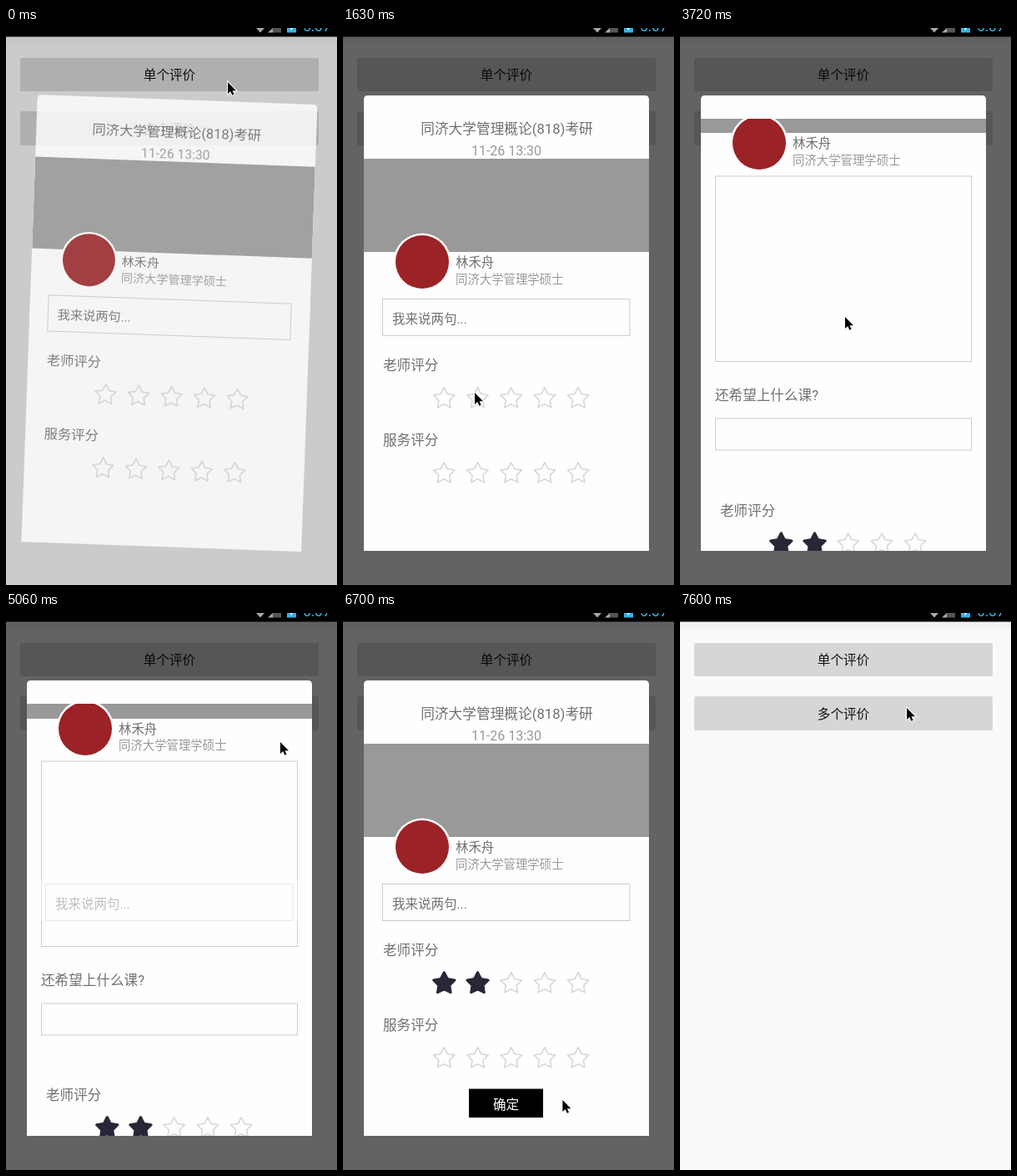
An HTML page for the animation above (8 s loop, 397 by 669 pixels).

```html
<!DOCTYPE html>
<html lang="zh-CN">
<head>
<meta charset="utf-8">
<title>评价</title>
<style>
  html, body { margin: 0; width: 100%; height: 100%; overflow: hidden; background: #f9f9f9; }
  svg { display: block; width: 397px; height: 669px; }
  text { font-family: Roboto, "Noto Sans CJK SC", "Noto Sans CJK", sans-serif; fill: #707070; }
  .mid { text-anchor: middle; }
  .soft { fill: #999; }
  .box { fill: #fefefe; stroke: #ccc; }
  .star { fill: none; stroke: #d9d9d9; stroke-width: 1.7; stroke-linejoin: round; }
  .star.on { fill: #272738; stroke: #272738; stroke-width: 3; }
  #dialog { transform-origin: 196px 354.5px; }
  #cursor { stroke: #fff; stroke-width: 2; paint-order: stroke; }
</style>
</head>
<body>
<svg viewBox="0 0 397 669">
  <defs>
    <clipPath id="pane"><rect x="25" y="109" width="342" height="519"/></clipPath>
  </defs>

  <rect width="397" height="669" fill="#f9f9f9"/>
  <rect y="10" width="397" height="9" fill="#f2f2f2"/>
  <g fill="#d5d7d6">
    <rect x="17" y="36" width="358" height="40" rx="2"/>
    <rect x="17" y="100" width="358" height="41" rx="2"/>
  </g>
  <g class="mid" font-size="15.6">
    <text x="196" y="62" style="fill:#111">单个评价</text>
    <text x="196" y="127" style="fill:#111">多个评价</text>
  </g>
  <rect id="dim" y="10" width="397" height="659"/>

  <rect width="397" height="10.5"/>
  <path d="M300 0h10l-5 5.5z" fill="#aaa"/>
  <path d="M314 5.5L320 0V5.5z" fill="#aaa"/>
  <path d="M320 0h10v5.5h-10z" fill="#555"/>
  <path d="M337 0h11v5.5h-11z" fill="#33b5e5"/>
  <path d="M341 0h3l-2 3z" fill="#fff"/>
  <text x="356" y="4" font-size="17.5" style="fill:#33b5e5">5:07</text>

  <g id="dialog">
    <path d="M25 628V86q0-5 5-5H362q5 0 5 5V628z" fill="#fefefe"/>
    <g clip-path="url(#pane)">
      <g id="header">
        <text class="mid" x="196.5" y="127" font-size="16.7">同济大学管理概论(818)考研</text>
        <text class="mid soft" x="196" y="153" font-size="16">11-26 13:30</text>
        <rect x="25" y="157" width="342" height="112" fill="#999"/>
        <circle cx="95" cy="281" r="34.5" fill="#fefefe"/>
        <circle cx="95" cy="281" r="32" fill="#9b2226"/>
        <text x="135" y="287" font-size="15.4">林禾舟</text>
        <text class="soft" x="135" y="306.5" font-size="14.4">同济大学管理学硕士</text>
      </g>
      <g id="form">
        <rect class="box" x="42.5" y="178" width="307" height="222.5"/>
        <text x="42" y="447" font-size="16.6">还希望上什么课?</text>
        <rect class="box" x="42.5" y="469" width="307" height="38"/>
      </g>
      <g id="hint">
        <rect x="25" y="320" width="342" height="50" fill="#fefefe"/>
        <rect class="box" x="47.5" y="325.5" width="296.5" height="44"/>
        <text x="59" y="354.5" font-size="15.5">我来说两句...</text>
      </g>
      <g id="ratings">
        <text x="48" y="411" font-size="16.6">老师评分</text>
        <text x="48" y="501" font-size="16.6">服务评分</text>
        <g id="confirm">
          <rect x="151" y="571.5" width="89" height="34.5"/>
          <text class="mid" x="195.5" y="595.5" font-size="15.6" style="fill:#fff">确定</text>
        </g>
      </g>
    </g>
  </g>

  <path id="cursor" d="M0 0V14L3.2 11L5.4 15.8L7.6 14.8L5.5 10.2H10z"/>
</svg>
<script>
const LOOP = 8000, TICK = 149, LEAD = 12; // the picture updates once per tick
const el = id => document.getElementById(id);
const [dim, dialog, header, form, hint, ratings, confirmButton, cursor] =
  ['dim', 'dialog', 'header', 'form', 'hint', 'ratings', 'confirm', 'cursor'].map(el);

const ramp = (now, from, to) => Math.min(1, Math.max(0, (now - from) / (to - from)));
const smooth = k => k * k * (3 - 2 * k);
const easeOut = k => 1 - (1 - k) ** 3;

// Mouse glides: first tick, last tick, destination.
const glides = [
  [5, 11, 158, 438], [17, 21, 198, 347], [28, 31, 329, 155], [38, 40, 402, 578],
  [44, 47, 205, 588], [47, 48, 297, 427], [48, 51, 272, 114]
];
const pointer = now => glides.reduce(([x, y], [from, to, toX, toY]) => {
  const k = easeOut(ramp(now, from, to));
  return [x + (toX - x) * k, y + (toY - y) * k];
}, [266, 65]);

// One-second damped swing, eased in and out, already under way at time zero.
function swing(now) {
  const angles = [0, 10, -10, 6, -6, 3, -3, 0];
  const progress = ramp(now * TICK, -110, 890);
  const position = (1 - Math.cos(Math.PI * progress)) / 2 * 7;
  const i = Math.min(6, Math.floor(position));
  return angles[i] + (angles[i + 1] - angles[i]) * (position - i);
}

function addStar(cx, cy) {
  const star = document.createElementNS('http://www.w3.org/2000/svg', 'polygon');
  const points = Array.from({ length: 10 }, (_, i) => {
    const radius = i % 2 ? 6.8 : 13.3, angle = i * Math.PI / 5;
    return [cx + radius * Math.sin(angle), cy - radius * Math.cos(angle)].map(v => v.toFixed(2));
  });
  star.setAttribute('points', points.join(' '));
  star.setAttribute('class', 'star');
  ratings.append(star);
  return star;
}
const stars = [445, 535].flatMap(y => Array.from({ length: 5 }, (_, i) => addStar(121.3 + i * 40.2, y)));

const move = (node, x, y) => node.setAttribute('transform', `translate(${x} ${y})`);

function render(time) {
  const now = Math.floor((time + LEAD) / TICK);
  const shown = ramp(now, -.74, .16) - ramp(now, 47, 48);
  const opening = ramp(now, 22, 25);
  const expand = smooth(opening) - smooth(ramp(now, 33.9, 36));

  dim.style.opacity = .6 * (ramp(now, -.9, 2) - ramp(now, 48, 51));
  dialog.style.opacity = shown;
  dialog.style.transform = `rotate(${swing(now)}deg) scale(${.9 + .1 * shown})`;
  confirmButton.style.opacity = ramp(now, 13, 16);
  form.style.opacity = expand;
  hint.style.opacity = 1 - opening + ramp(now, 33, 35.3);
  move(header, 0, -143 * expand);
  move(ratings, 0, 175 * expand);
  move(cursor, ...pointer(now));
  stars.slice(0, 2).forEach(star => star.classList.toggle('on', now >= 14));
}

function loop() {
  render(performance.now() % LOOP);
  requestAnimationFrame(loop);
}
loop();
</script>
</body>
</html>
```
